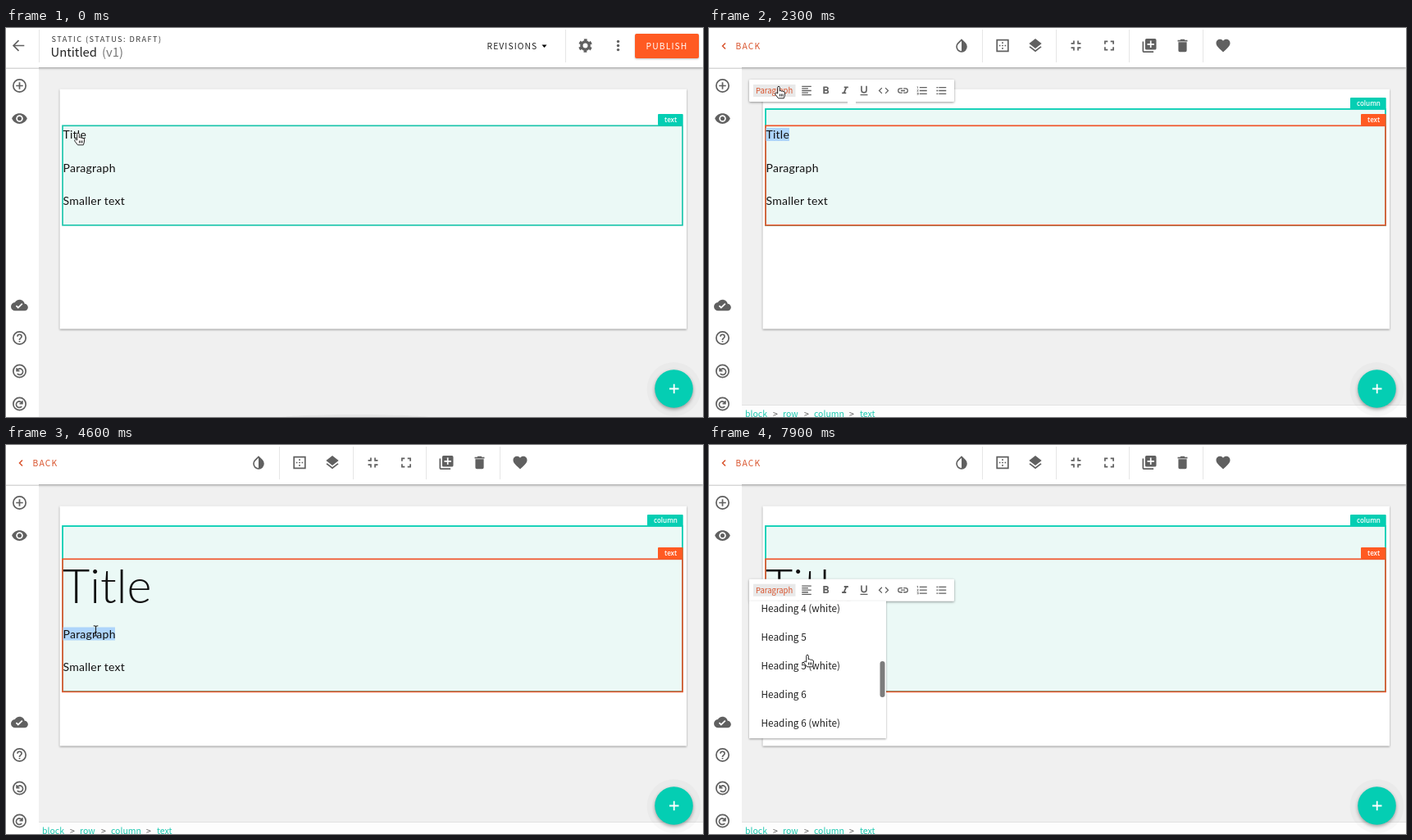
Animation, 850 px wide and 475 px high, one loop 8000 ms. Source, as an HTML page:

```html
<!DOCTYPE html>
<html lang="en">
<head>
<meta charset="utf-8">
<title>Text block editor</title>
<style>
html, body { margin: 0; width: 100%; height: 100%; overflow: hidden; background: #f0f0f0; }
svg { display: block; width: 850px; height: 475px; font-family: "Noto Sans CJK JP", "Noto Sans CJK SC", "Noto Sans CJK", "Open Sans", sans-serif; }
.body { font: 14px Lato, sans-serif; letter-spacing: .25px; }
.h1 { font: 300 57.5px Lato, sans-serif; }
.tag { font: 600 8px "Open Sans", sans-serif; }
.line { fill: none; stroke: #606060; stroke-width: 2; }
.sheet { fill: #fff; filter: drop-shadow(0 1px 1.2px rgba(0,0,0,.38)); }
.bar { fill: #fff; filter: drop-shadow(0 1px 1.5px rgba(0,0,0,.4)); }
.fab { fill: #04ceb3; filter: drop-shadow(0 2px 2px rgba(0,0,0,.35)); }
</style>
</head>
<body>
<svg id="stage" viewBox="0 0 850 475"></svg>
<script>
const TEAL = '#04ceb3', ORANGE = '#ff5a22', RUST = '#d9532c', TINT = '#ebf9f6', SELECT = '#aed5fb';
const stage = document.getElementById('stage');

const text = (x, y, str, size, fill = '#222', spacing = 0, extra = '') =>
  `<text x="${x}" y="${y}" font-size="${size}" fill="${fill}" letter-spacing="${spacing}" ${extra}>${str}</text>`;
const rect = (x, y, w, h, fill, extra = '') =>
  `<rect x="${x}" y="${y}" width="${w}" height="${h}" fill="${fill}" ${extra}/>`;
const group = (id, content, extra = '') => `<g id="${id}" ${extra}>${content}</g>`;
const rule = x => rect(x, 2, 1, 40, '#e6e6e6');

// Icons live on a 24-unit grid; those starting with "<" are ready markup.
const stroke = d => `<path class="line" d="${d}"/>`;
const ring = '<circle class="line" cx="12" cy="12" r="9"/>';
const turn = ring + stroke('M8 7.5v4h4M8.4 11a4.4 4.4 0 1 1 .4 4.4');
const icons = {
  back: stroke('M20 12H5M12 4.5L4.5 12l7.5 7.5'),
  add: ring + stroke('M12 7v10M7 12h10'),
  eye: 'M12 4.5C7 4.5 2.7 7.6 1 12c1.7 4.4 6 7.5 11 7.5s9.3-3.1 11-7.5c-1.7-4.4-6-7.5-11-7.5zM12 17a5 5 0 1 1 0-10 5 5 0 0 1 0 10zm0-8a3 3 0 1 0 0 6 3 3 0 0 0 0-6z',
  cloud: 'M19.35 10C18.7 6.6 15.6 4 12 4 9.1 4 6.6 5.6 5.35 8A6 6 0 0 0 6 20h13a5 5 0 0 0 .35-10zM10 17l-3.5-3.5 1.4-1.4 2.1 2.1L15.2 9l1.4 1.4z',
  help: ring + '<path d="M11 18h2v-2h-2zm1-12a4 4 0 0 0-4 4h2a2 2 0 0 1 4 0c0 2-3 1.75-3 5h2c0-2.25 3-2.5 3-5a4 4 0 0 0-4-4z"/>',
  undo: turn,
  redo: `<g transform="matrix(-1 0 0 1 24 0)">${turn}</g>`,
  gear: '<g fill="none" stroke="#606060"><circle cx="12" cy="12" r="5.5" stroke-width="4"/><circle cx="12" cy="12" r="8.3" stroke-width="3" stroke-dasharray="4.35" stroke-dashoffset="-2.17"/></g>',
  more: [6, 12, 18].map(y => `<circle cx="12" cy="${y}" r="2"/>`).join(''),
  drop: 'M17.66 7.93L12 2.27 6.34 7.93a8 8 0 1 0 11.32 0zM12 19.6a6 6 0 0 1-4.24-10.25L12 5.1z',
  border: 'M13 7h-2v2h2zm0 4h-2v2h2zm4 0h-2v2h2zM3 3v18h18V3zm16 16H5V5h14zm-6-4h-2v2h2zm-4-4H7v2h2z',
  layers: 'M12 18.5l-7.4-5.7L3 14.1l9 7 9-7-1.6-1.3zM12 16l9-7-9-7-9 7z',
  shrink: stroke('M5 15h4v4M9 5v4H5M15 19v-4h4M15 5v4h4'),
  expand: stroke('M6 14v4h4M6 10V6h4M14 18h4v-4M14 6h4v4'),
  copy: 'M4 6H2v14a2 2 0 0 0 2 2h14v-2H4zm16-4H8a2 2 0 0 0-2 2v12a2 2 0 0 0 2 2h12a2 2 0 0 0 2-2V4a2 2 0 0 0-2-2zm-1 9h-4v4h-2v-4H9V9h4V5h2v4h4z',
  trash: 'M6 19a2 2 0 0 0 2 2h8a2 2 0 0 0 2-2V7H6zM19 4h-3.5l-1-1h-5l-1 1H5v2h14z',
  heart: 'M12 21.35l-1.45-1.32C5.4 15.36 2 12.28 2 8.5 2 5.4 4.4 3 7.5 3c1.74 0 3.4.8 4.5 2.1C13.1 3.8 14.8 3 16.5 3 19.6 3 22 5.4 22 8.5c0 3.78-3.4 6.86-8.55 11.54z',
  align: stroke('M3 4h18M3 8h12M3 12h18M3 16h12M3 20h18'),
  bold: 'M15.6 10.8A3.9 3.9 0 0 0 17.25 8a4 4 0 0 0-4-4H7v14h7a3.8 3.8 0 0 0 1.6-7.2zM10 6.5h3a1.5 1.5 0 0 1 0 3h-3zm3.5 9H10v-3h3.5a1.5 1.5 0 0 1 0 3z',
  italic: 'M10 4v3h2.2l-3.4 8H6v3h8v-3h-2.2l3.4-8H18V4z',
  underline: 'M12 17a6 6 0 0 0 6-6V3h-2.5v8a3.5 3.5 0 0 1-7 0V3H6v8a6 6 0 0 0 6 6zm-7 2v2h14v-2z',
  code: stroke('M8.7 6.7L3.4 12l5.3 5.3M15.3 6.7l5.3 5.3-5.3 5.3'),
  link: stroke('M11 8H7a4 4 0 0 0 0 8h4M13 8h4a4 4 0 0 1 0 8h-4M8 12h8'),
  ordered: stroke('M7 6h14M7 12h14M7 18h14') + '<path d="M2 17h2v.5H3v1h1v.5H2v1h3v-4H2zm1-9h1V4H2v1h1zm-1 3h1.8L2 13.1v.9h3v-1H3.2L5 10.9V10H2z"/>',
  bullets: stroke('M7 6h14M7 12h14M7 18h14M2.5 6h3M2.5 12h3M2.5 18h3')
};
const icon = (name, x, y, scale = .85) => {
  const art = icons[name];
  return `<g fill="#606060" transform="translate(${x} ${y}) scale(${scale}) translate(-12 -12)">` +
    (art[0] === '<' ? art : `<path fill-rule="evenodd" d="${art}"/>`) + '</g>';
};
const iconRow = (names, xs, y, scale) => names.split(' ').map((n, i) => icon(n, xs[i], y, scale)).join('');

const sidebar = rect(0, 48, 40, 427, '#fff') +
  'add eye cloud help undo redo'.split(' ')
    .map((n, i) => icon(n, 16.5, [70.5, 110.5, 338.5, 378.5, 419, 459][i])).join('');

const viewHeader = icon('back', 15.5, 21.5) + rule(40) +
  text(55.5, 16.5, 'STATIC (STATUS: DRAFT)', 9.2, '#333', 1.43) +
  text(54.5, 34.5, 'Untitled', 14.8) + text(117, 34.5, '(v1)', 14.8, '#777') +
  text(586.5, 26, 'REVISIONS', 10.4, '#222', 1.05) + '<path d="M653.5 20.5h6l-3 3.5z"/>' + rule(682) +
  icon('gear', 706.5, 21.5) + icon('more', 746.5, 21.5) +
  rect(767, 7, 78, 30, ORANGE, 'rx="2" style="filter:drop-shadow(0 1px 1px rgba(0,0,0,.25))"') +
  text(780.5, 26, 'PUBLISH', 10.3, '#fff', 1.15);

const editHeader = `<path d="M20 18.5L16.5 22l3.5 3.5" fill="none" stroke="${RUST}" stroke-width="1.5"/>` +
  text(32.5, 26, 'BACK', 10.3, RUST, 1.2) + [333, 423, 512, 602].map(rule).join('') +
  iconRow('drop border layers shrink expand copy trash heart', [308, 358, 398, 447.5, 488, 537, 577.5, 627], 21.5);

const crumbs = rect(40, 460, 810, 15, '#fdfdfd') + rect(40, 460, 810, 1, '#e2e2e2') +
  [[44, 'block'], [90, 'row'], [128, 'column'], [184, 'text']].map(([x, s]) => text(x, 475, s, 10.5, '#1fc9b1')).join('') +
  [78, 116, 171].map(x => text(x, 475, '&gt;', 10.5, '#555')).join('');

const toolbar = '<rect id="barBox" class="bar" x="49" y="63" width="250" height="27" rx="1"/>' +
  rect(169, 86, 10, 7, '#fff', 'id="notch"') + rect(54, 69, 51.5, 15, '#e9e9e9') +
  text(57, 80, '', 9.45, '#666', 0, 'id="style"') +
  group('tools', iconRow('align bold italic underline code link ordered bullets',
    [119, 142.5, 166, 189, 213, 236.5, 260, 283.5], 76.5, .64));

const styles = [1, 2, 3, 4, 5, 6].flatMap(n => [`Heading ${n}`, `Heading ${n} (white)`]).concat('Paragraph', 'Paragraph (white)');
const menu = '<rect class="sheet" x="49" y="89.5" width="167" height="168"/>' +
  '<g clip-path="url(#menuClip)">' + group('items', styles.map((s, i) => text(63.5, 112.7 + i * 34.85, s, 11.8)).join('')) + '</g>' +
  rect(208.5, 92, 6, 44, '#7c7c7c', 'id="thumb" rx="3"');

const tag = (x, y, label, fill) => rect(x, y, 825.7 - x, 14, fill, 'rx="1"') +
  text(x + 8, y + 10.3, label, 8, '#fff', 0, 'class="tag"');

const hand = '<path d="M-1.3 8V.6a1.3 1.3 0 0 1 2.6 0V5a1.3 1.3 0 0 1 2.3.4 1.2 1.2 0 0 1 2.1.6 1.1 1.1 0 0 1 1.8 1v3.2l-1.2 3.6H-.5L-4.2 9a1.3 1.3 0 0 1 1.8-1.7zM1.5 8.5v3M3.4 8.5v3M5.2 8.5v3" fill="#fff" stroke="#111" stroke-width=".9" stroke-linejoin="round"/>';
const arrow = '<path d="M0 0v11.2l2.6-2.4 1.8 4.1 1.9-.8-1.8-4H8z" stroke="#fff" stroke-width=".8"/>';
const beam = '<path d="M-2.8-6.3Q0-6.3 0-4.8Q0-6.3 2.8-6.3M0-4.8V5M-2.8 6.3Q0 6.3 0 4.8Q0 6.3 2.8 6.3M-1.5 1.5h3" fill="none" stroke="#222" stroke-width="1.1"/>';

stage.innerHTML =
  '<defs><clipPath id="menuClip"><rect x="49" y="90" width="167" height="167.5"/></clipPath></defs>' +
  rect(0, 0, 850, 475, '#f0f0f0') + '<rect class="sheet" x="65.5" y="74.5" width="764.5" height="293"/>' +
  group('column', rect(69, 99, 756, 140, TINT, `id="columnBox" stroke="${TEAL}" stroke-width="1.8"`) + tag(782, 85, 'column', TEAL)) +
  rect(69, 119.3, 756, 121.5, 'none', 'id="block" stroke-width="1.7"') +
  group('hoverTag', tag(795, 105, 'text', TEAL)) + group('editTag', tag(795, 105, 'text', ORANGE)) +
  rect(69.5, 122, 28.5, 16, SELECT, 'id="pickTitle"') + rect(69.5, 136, 105, 68, SELECT, 'id="pickHeading"') +
  rect(69.5, 222.5, 63.5, 16, SELECT, 'id="pickParagraph"') +
  text(69.5, 135.3, 'Title', 14, '#111', 0, 'id="plain" class="body"') +
  text(69, 193, 'Title', 57, '#111', 0, 'id="heading" class="h1"') +
  group('rest', text(69.5, 175.5, 'Paragraph', 14, '#111', 0, 'class="body"') + text(69.5, 215.7, 'Smaller text', 14, '#111', 0, 'class="body"')) +
  group('panel', toolbar + group('menu', menu)) +
  rect(0, 0, 850, 48, '#fff', 'class="bar"') + sidebar + rect(0, 48.5, 40, 1.5, '#d8d8d8') +
  group('viewHeader', viewHeader + '<ellipse cx="426" cy="477" rx="98" ry="5" fill="#e5e5e5"/>') +
  group('editHeader', editHeader + crumbs) +
  '<circle cx="814.5" cy="441" r="33" fill="#000" opacity=".025"/><circle class="fab" cx="814.5" cy="440.5" r="23.3"/>' +
  '<path d="M809 440.5h11.5M814.7 434.7v11.5" stroke="#fff" stroke-width="1.8"/>' +
  group('cursor', group('hand', hand) + group('arrow', arrow) + group('beam', beam));

const el = id => document.getElementById(id);
const show = (id, on) => { el(id).style.display = on ? '' : 'none'; };
const set = (id, attrs) => { for (const k in attrs) el(id).setAttribute(k, attrs[k]); };

// Eased value along [time, value] stops.
function track(stops, t) {
  const i = stops.findIndex(s => s[0] > t);
  if (i < 0) return stops[stops.length - 1][1];
  if (i === 0) return stops[0][1];
  const [t0, a] = stops[i - 1], [t1, b] = stops[i];
  const u = (t - t0) / (t1 - t0);
  return a + (b - a) * u * u * (3 - 2 * u);
}
const hold = (stops, t) => stops.filter(s => s[0] <= t).pop()[1];

const cursorX = [[0, 88], [400, 88], [1000, 85.5], [1900, 85.5], [2300, 85], [2600, 85], [2900, 91], [3200, 91], [3600, 105.5], [4300, 109.5], [4800, 109.5], [5500, 87], [6200, 87], [6500, 120]];
const cursorY = [[0, 129], [400, 129], [1000, 128], [1900, 128], [2300, 72], [2600, 72], [2900, 104], [3200, 104], [3600, 117], [4300, 227], [4800, 227], [5500, 176], [6200, 176], [6500, 257]];
const cursorKind = [[0, 'hand'], [500, 'beam'], [2100, 'hand'], [3000, 'arrow'], [4000, 'beam'], [5300, 'hand']];
const scrollStops = [[6700, 0], [7100, 140], [7300, 140], [7600, 238], [7800, 238], [7900, 253]];

function render(now) {
  const t = Math.floor(now % 8000 / 100) * 100;
  const within = (a, b) => t >= a && t < b;
  const editing = t >= 500, titled = t >= 3000, second = t >= 4900;
  const headingBar = within(3000, 4100), hasColumn = t >= 2000;
  const menuOpen = within(2400, 3000) || t >= 5600;

  show('viewHeader', !editing);
  show('editHeader', editing);
  show('hoverTag', !editing);
  show('editTag', editing);
  show('column', hasColumn);
  set('columnBox', { height: titled ? 202 : 142 });
  set('block', { y: titled ? 139.3 : 119.3, height: titled ? 162 : 121.5, stroke: editing ? '#f0562c' : '#1fc6ad', fill: editing ? 'none' : TINT });
  set('editTag', { transform: `translate(0 ${titled ? 20 : 0})` });

  show('plain', !titled);
  show('heading', titled);
  set('rest', { transform: `translate(0 ${titled ? 60.3 : 0})` });
  show('pickTitle', within(1000, 3000));
  show('pickHeading', headingBar);
  show('pickParagraph', t >= 4400);

  show('panel', within(1300, 4100) || second);
  set('panel', { transform: `translate(0 ${second ? 100.7 : 0})` });
  set('barBox', { width: headingBar ? 249 : 250 });
  set('tools', { transform: `translate(${headingBar ? -1 : 0} 0)` });
  el('style').textContent = headingBar ? 'Heading 1' : 'Paragraph';
  set('style', { fill: within(2200, 3000) || t >= 5400 ? RUST : '#666' });
  show('notch', !menuOpen);
  show('menu', menuOpen);
  const scroll = track(scrollStops, t);
  set('items', { transform: `translate(0 ${-scroll})` });
  show('thumb', scroll > 0);
  set('thumb', { y: 91.3 + scroll * .285 });

  const kind = hold(cursorKind, t);
  for (const k of ['hand', 'arrow', 'beam']) show(k, k === kind);
  set('cursor', { transform: `translate(${track(cursorX, t)} ${track(cursorY, t)})` });
}
function loop() {
  render(performance.now());
  requestAnimationFrame(loop);
}
loop();
</script>
</body>
</html>
```
